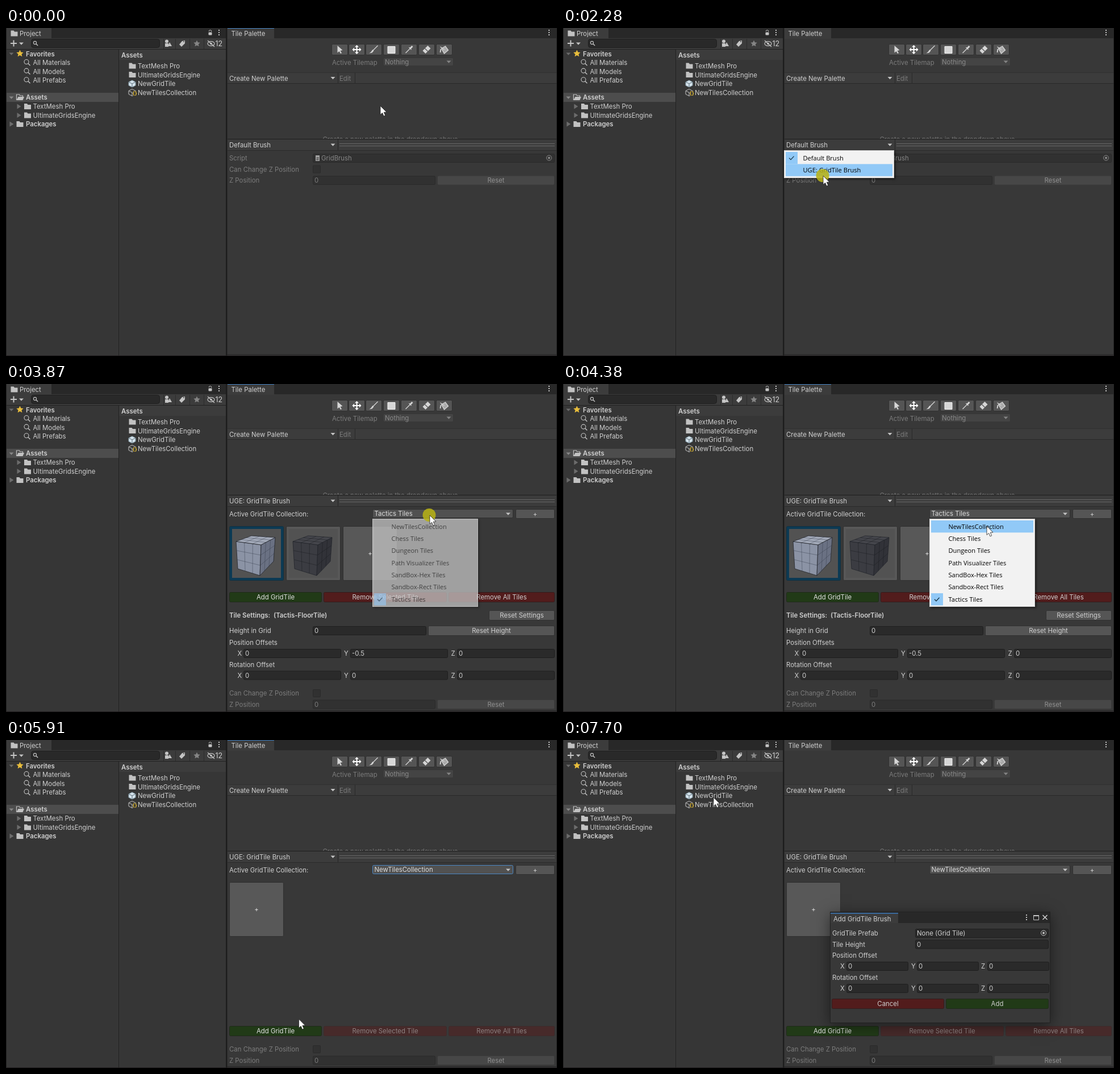
An HTML page with a canvas that plays this animation: 970x577 px, repeating every 8 s.

```html
<!DOCTYPE html>
<html>
<head>
<meta charset="utf-8">
<style>
html, body { margin: 0; width: 100%; height: 100%; overflow: hidden; background: #383838; }
canvas { display: block; }
</style>
</head>
<body>
<canvas id="stage" width="970" height="577"></canvas>
<script>
const ctx = document.getElementById('stage').getContext('2d');
const LOOP = 8000;
const UI = '11.4px Inter, sans-serif', BOLD = '600 11.4px Inter, sans-serif', MENU = '11.1px "Open Sans", sans-serif';
const INK = '#d0d0d0', DIM = '#7c7c7c', LINE = '#222';
const GREEN = '#213a17', RED = '#521c1c', DIM_RED = '#472a2a';

function rect(x, y, w, h, color) { ctx.fillStyle = color; ctx.fillRect(x, y, w, h); }
function box(x, y, w, h, fill, stroke, r = 2) {
  ctx.beginPath();
  ctx.roundRect(x + .5, y + .5, w - 1, h - 1, r);
  if (fill) { ctx.fillStyle = fill; ctx.fill(); }
  if (stroke) { ctx.strokeStyle = stroke; ctx.lineWidth = 1; ctx.stroke(); }
}
function text(s, x, cy, color = INK, font = UI, align = 'left') {
  ctx.font = font; ctx.fillStyle = color; ctx.textAlign = align;
  ctx.fillText(s, x, cy + 4);
}
function poly(points, fill, stroke, width = 1) {
  ctx.beginPath();
  points.forEach(p => ctx.lineTo(p[0], p[1]));
  ctx.closePath();
  if (fill) { ctx.fillStyle = fill; ctx.fill(); }
  if (stroke) { ctx.strokeStyle = stroke; ctx.lineWidth = width; ctx.stroke(); }
}
function line(x1, y1, x2, y2, color, width = 1) {
  ctx.strokeStyle = color; ctx.lineWidth = width;
  ctx.beginPath(); ctx.moveTo(x1, y1); ctx.lineTo(x2, y2); ctx.stroke();
}
function circle(x, y, r, fill, stroke, width = 1) {
  ctx.beginPath(); ctx.arc(x, y, r, 0, 7);
  if (fill) { ctx.fillStyle = fill; ctx.fill(); }
  if (stroke) { ctx.strokeStyle = stroke; ctx.lineWidth = width; ctx.stroke(); }
}
function shifted(x, y, draw) { ctx.save(); ctx.translate(x, y); draw(); ctx.restore(); }

// Icons
const arrowDown = (x, y, c = '#c4c4c4') => poly([[x - 4, y - 2], [x + 4, y - 2], [x, y + 2.2]], c);
const arrowRight = (x, y) => poly([[x - 3, y - 4.5], [x + 4, y], [x - 3, y + 4.5]], '#6c6c6c');
const dots = (x, y) => [-4, 0, 4].forEach(d => rect(x - 1, y + d - 1, 2, 2, '#c4c4c4'));
function star(x, y, r, color) {
  const pts = [];
  for (let i = 0; i < 10; i++) {
    const a = i * Math.PI / 5 - Math.PI / 2, d = i % 2 ? r * .48 : r;
    pts.push([x + d * Math.cos(a), y + d * Math.sin(a)]);
  }
  poly(pts, color);
}
function magnifier(x, y, r, c = '#c4c4c4') {
  circle(x - 1, y - 1, r, null, c, 1.1);
  line(x - 1 + r * .7, y - 1 + r * .7, x + r + 1.5, y + r + 1.5, c, 1.4);
}
function folder(x, y) {
  poly([[x - 6, y - 5], [x - 1, y - 5], [x + .5, y - 3], [x + 6, y - 3], [x + 6, y + 5], [x - 6, y + 5]], '#c2c2c2');
}
function openFolder(x, y) {
  poly([[x - 6, y + 4], [x - 6, y - 5], [x - 1, y - 5], [x, y - 3], [x + 5, y - 3], [x + 5, y - 1]], null, '#c2c2c2', 1.2);
  poly([[x - 6, y + 5], [x - 3, y - 1], [x + 7.5, y - 1], [x + 5, y + 5]], '#c2c2c2');
}
function hexCube(x, y, solid) {
  const p = [[x, y - 6], [x + 6, y - 3], [x + 6, y + 3], [x, y + 6], [x - 6, y + 3], [x - 6, y - 3]];
  poly(p, solid && '#d5e3ec', solid ? '#8da4b0' : '#c4c4c4');
  const c = solid ? '#596b76' : '#c4c4c4';
  line(x - 6, y - 3, x, y, c); line(x + 6, y - 3, x, y, c); line(x, y, x, y + 6, c);
}

// Widgets
function button(label, x, y, w, h = 17, fill = '#555', ink = INK, stroke = '#303030') {
  box(x, y, w, h, fill, stroke);
  text(label, x + w / 2, y + h / 2, ink, UI, 'center');
}
function field(value, x, cy, w, off) {
  box(x, cy - 8, w, 16, off ? '#313131' : '#2a2a2a', off ? '#2a2a2a' : '#1e1e1e');
  text(value, x + 3, cy, off ? DIM : INK);
}
function dropdown(label, x, y, w, focus) {
  box(x, y, w, 16, '#515151', focus ? '#4a87c4' : '#303030');
  text(label, x + 3.5, y + 8, '#dedede');
  arrowDown(x + w - 9, y + 8.5);
}
function vectorRow(values, cy, labels, xs, w) {
  ['X', 'Y', 'Z'].forEach((n, i) => {
    text(n, labels[i], cy);
    field(values[i], xs[i], cy, w);
  });
}
function picker(x, y, c) { circle(x, y, 4.5, null, c); circle(x, y, 2, c); }

function projectPanel() {
  rect(0, 38, 388, 539, '#363636');
  rect(0, 0, 388, 18, '#282828');
  rect(1, 0, 79, 19, '#3c3c3c');
  rect(0, 18, 388, 19, '#3c3c3c');
  rect(0, 37, 388, 1, LINE);
  folder(14.5, 9.5); text('Project', 24, 9.5);
  box(356, 7, 7, 6, '#c4c4c4', null, 1);
  ctx.beginPath(); ctx.arc(359.5, 6, 2.3, Math.PI, .3); ctx.strokeStyle = '#c4c4c4'; ctx.stroke();
  dots(375, 8);

  rect(8, 26, 11, 2, '#c4c4c4'); rect(12.5, 21.5, 2, 11, '#c4c4c4');
  arrowDown(27, 27.5);
  box(44, 19, 227, 16, '#292929', '#1e1e1e', 4);
  magnifier(52, 27, 2.6);
  [277, 298, 323, 348].forEach(x => rect(x, 19, 1, 18, '#2c2c2c'));
  circle(283, 23.5, 3, '#c4c4c4'); rect(280, 27, 6, 6, '#c4c4c4');
  poly([[288, 25], [292, 32], [285, 32]], '#c4c4c4');
  poly([[305, 29], [310, 23], [315, 22], [315, 27], [309, 33]], '#c4c4c4');
  circle(313, 24, .9, '#3c3c3c');
  star(336, 27.5, 6, '#858585');
  ctx.beginPath(); ctx.ellipse(361, 27.5, 6, 3.8, 0, 0, 7);
  ctx.strokeStyle = '#c4c4c4'; ctx.lineWidth = 1.2; ctx.stroke();
  circle(361, 27.5, 1.8, '#c4c4c4');
  line(355, 22, 367, 33, '#c4c4c4', 1.3);
  text('12', 368.5, 27.5, INK, '12.4px Inter, sans-serif');

  rect(1, 114, 197, 16, '#4d4d4d');
  arrowDown(9.5, 45.5, '#6c6c6c'); star(24.5, 45, 6.5, '#e8bd3c'); text('Favorites', 35, 45.5, INK, BOLD);
  ['All Materials', 'All Models', 'All Prefabs'].forEach((s, i) => {
    const y = 61 + i * 15.6;
    magnifier(37, y - .5, 4); text(s, 47.5, y);
  });
  arrowDown(9.5, 122.5, '#888'); openFolder(24.5, 122); text('Assets', 35, 122, INK, BOLD);
  ['TextMesh Pro', 'UltimateGridsEngine'].forEach((s, i) => {
    arrowRight(22.5, 138 + i * 15.6); folder(38, 138 + i * 15.6); text(s, 47.5, 138 + i * 15.6);
    folder(222.5, 66.5 + i * 15.6); text(s, 232, 67 + i * 15.6);
  });
  arrowRight(9.5, 169); folder(24.5, 169); text('Packages', 35, 169, INK, BOLD);

  rect(199, 38, 189, 18, '#3c3c3c');
  rect(198, 38, 1, 538, LINE);
  text('Assets', 203, 47.5, INK, BOLD);
  hexCube(222, 98, true); text('NewGridTile', 232, 98);
  hexCube(222, 113.5); text('NewTilesCollection', 232, 113.5);
  rect(223, 111, 8, 8, '#363636');
  text('{}', 222.5, 114, '#e3bd36', '700 9px Inter, sans-serif');
  rect(0, 0, 1, 577, '#202020');
}

function toolIcon(i, x, y) {
  const c = '#d6d6d6';
  shifted(x, y, () => {
    if (i === 0) poly([[-4, -7], [5, 1], [1, 2], [3.5, 6], [1.5, 7], [-.8, 3], [-4, 5.5]], c);
    if (i === 1) {
      line(-6, 0, 6, 0, '#fff', 2); line(0, -6, 0, 6, '#fff', 2);
      for (let k = 0; k < 4; k++) {
        ctx.rotate(Math.PI / 2);
        poly([[4.5, -3.5], [8, 0], [4.5, 3.5]], '#fff');
      }
    }
    if (i === 2) { line(7, -7, -2, 2, c, 1.3); poly([[-2, 0], [0, 2], [-3, 5.5], [-8, 6.5], [-5, 4]], c); }
    if (i === 3) box(-7, -6, 14, 13, c, '#f4f4f4', 0);
    if (i === 4) { line(-6, 6, 2, -2, c, 1.3); line(0, -4, 4, 0, c, 1.3); line(2, -2, 6, -6, c, 2.8); }
    if (i === 5) {
      poly([[-7, 2], [2, -7], [7, -2], [-2, 7]], c);
      line(-3, -2, 2, 3, '#555', 1.2);
    }
    if (i === 6) {
      poly([[-5, -2], [2, -6], [7, 1], [0, 7]], '#aaa', c, 1.3);
      line(-7, -5, 0, 0, c, 1.2); line(-6, -1, -7, 5, c, 1.8);
    }
  });
}

function palettePanel(focused, brush) {
  rect(389, 0, 581, 18, '#282828');
  rect(390, 0, 82, 19, '#3c3c3c');
  if (focused) rect(390, 0, 82, 1, '#3a79bb');
  text('Tile Palette', 396.5, 9.5);
  dots(956, 8);
  [573, 603, 633, 664, 695, 726, 757].forEach((x, i) => {
    box(x, 28, 29, 20, '#555', '#303030');
    toolIcon(i, x + 14.5, 38);
  });
  text('Active Tilemap', 574, 61, DIM);
  box(664, 52, 124, 15, '#444', '#373737');
  text('Nothing', 667, 59.5, '#898989'); arrowDown(779.5, 59.5, '#858585');

  rect(389, 78, 581, 20, '#3c3c3c');
  rect(389, 78, 581, 1, '#303030'); rect(389, 97, 581, 1, '#292929');
  text('Create New Palette', 393, 88.5); arrowDown(575.5, 88);
  text('Edit', 587, 88.5, DIM);
  rect(584, 79, 1, 18, '#292929'); rect(614, 79, 1, 18, '#292929');
  ctx.save();
  ctx.beginPath(); ctx.rect(389, 98, 580, 97); ctx.clip();
  text('Create a new palette in the dropdown above.', 678, 196, '#757575', UI, 'center');
  ctx.restore();

  rect(389, 195, 581, 1, '#1e1e1e');
  rect(389, 196, 581, 19, '#3c3c3c'); rect(389, 215, 581, 1, '#2b2b2b');
  text(brush, 393, 206); arrowDown(575.5, 205.5);
  rect(584, 196, 1, 19, '#252525');
  rect(587, 203, 379, 1, '#686868'); rect(587, 207, 379, 1, '#686868');
}

function zRows(y) {
  text('Can Change Z Position', 393, y, DIM);
  box(540, y - 7, 14, 14, '#313131', '#2a2a2a', 1);
  text('Z Position', 393, y + 19.5, DIM);
  field('0', 540, y + 19.5, 216, true);
  button('Reset', 759, y + 11, 207, 17, '#474747', '#919191', '#3a3a3a');
}

function defaultBrush() {
  text('Script', 393, 229, DIM);
  field('', 540, 229, 426, true);
  rect(545, 224, 7, 10, '#a0a0a0');
  text('#', 546, 229, '#333', '8px Inter, sans-serif');
  text('GridBrush', 555, 229, '#858585');
  picker(956, 228.5, '#8a8a8a');
  zRows(248.5);
}

function cube(dx, left, right, top, grid) {
  const tl = [405, 277], tb = [432, 267], tr = [474, 270], tf = [449, 283];
  const bl = [408, 325], bf = [447, 337], br = [471, 312];
  const mix = (a, b, u) => [a[0] + (b[0] - a[0]) * u, a[1] + (b[1] - a[1]) * u];
  const face = (a, b, c, d, fill) => {
    poly([a, b, c, d], fill);
    for (const u of [1 / 3, 2 / 3]) {
      line(...mix(a, b, u), ...mix(d, c, u), grid, .7);
      line(...mix(a, d, u), ...mix(b, c, u), grid, .7);
    }
    poly([a, b, c, d], null, '#22252b', .8);
  };
  shifted(dx, 0, () => {
    face(tl, tf, bf, bl, left); face(tf, tr, br, bf, right); face(tl, tb, tr, tf, top);
  });
}

function plusTile(x, hover) {
  box(x, 250, 96, 96, hover ? '#666' : '#585858', '#303030');
  text('+', x + 48, 298, '#e4e4e4', UI, 'center');
}
function collectionHeader(name, focus) {
  text('Active GridTile Collection:', 393, 229);
  dropdown(name, 645, 220, 248, focus);
  button('+', 897, 220, 69, 17);
}
function tileButtons(y, enabled, hover) {
  const fill = enabled ? RED : DIM_RED, ink = enabled ? INK : '#8d8181';
  const edge = enabled ? '#341c1c' : '#3c2c2c';
  button('Add GridTile', 393, y, 163, 18, hover ? '#2b4f1b' : GREEN, '#e4e4e4', '#1f2a1a');
  button('Remove Selected Tile', 559, y, 217, 18, fill, ink, edge);
  button('Remove All Tiles', 779, y, 187, 18, fill, ink, edge);
}

function tacticsBrush(t) {
  collectionHeader('Tactics Tiles');
  box(393, 250, 96, 96, '#0c3a54', '#12303f'); rect(398, 255, 86, 86, '#525252');
  cube(0, '#8b93a5', '#6a7183', '#a2a9b8', 'rgba(50,56,70,.6)');
  box(493, 250, 96, 96, '#585858', '#303030'); rect(498, 255, 86, 86, '#525252');
  cube(100, '#3b3c42', '#313238', '#45464c', 'rgba(28,29,34,.7)');
  plusTile(593, t >= 2680 && t < 2800);
  tileButtons(366, true);
  text('Tile Settings:  (Tactis-FloorTile)', 393, 407, INK, BOLD);
  button('Reset Settings', 850, 398, 116, 18);
  text('Height in Grid', 393, 434); field('0', 540, 434, 200);
  button('Reset Height', 743, 425, 223, 18);
  const labels = [407.5, 595, 783.5], xs = [418, 606, 794];
  text('Position Offsets', 393, 454.5); vectorRow(['0', '-0.5', '0'], 474, labels, xs, 172);
  text('Rotation Offset', 393, 493.5); vectorRow(['0', '0', '0'], 512.5, labels, xs, 172);
  zRows(544);
}

function newBrush(t) {
  collectionHeader('NewTilesCollection', t < 6600);
  plusTile(393);
  tileButtons(503, false, t >= 6040 && t < 6920);
  zRows(544);
}

function popup(x, y, w, items, checked, hovered, alpha) {
  const row = 21.35, h = Math.round(items.length * row + 6);
  ctx.save();
  ctx.globalAlpha = alpha;
  ctx.shadowColor = 'rgba(0,0,0,.55)'; ctx.shadowBlur = 4; ctx.shadowOffsetX = ctx.shadowOffsetY = 2;
  rect(x, y, w, h, '#f2f2f2');
  ctx.shadowColor = 'transparent';
  box(x, y, w, h, null, '#cfcfcf', 0);
  items.forEach((s, i) => {
    const top = y + 3 + i * row, cy = top + row / 2;
    if (i === hovered) rect(x + 3, top, w - 6, row, '#91c9f7');
    if (i === checked) {
      rect(x + 3, top, 21, row, i === hovered ? '#56b0fa' : '#91c9f7');
      ctx.strokeStyle = '#16303f'; ctx.lineWidth = 1.2;
      ctx.beginPath(); ctx.moveTo(x + 9, cy); ctx.lineTo(x + 12, cy + 3); ctx.lineTo(x + 17.5, cy - 3); ctx.stroke();
    }
    text(s, x + 33.5, cy, '#000', MENU);
  });
  ctx.restore();
}

const COLLECTIONS = ['NewTilesCollection', 'Chess Tiles', 'Dungeon Tiles', 'Path Visualizer Tiles',
  'SandBox-Hex Tiles', 'Sandbox-Rect Tiles', 'Tactics Tiles'];

function menus(t) {
  if (t >= 1350 && t < 2330)
    popup(389, 215, 194, ['Default Brush', 'UGE: GridTile Brush'], 0, t < 1520 ? -1 : 1, t < 1400 ? .7 : 1);
  if (t >= 3870 && t < 4960)
    popup(645, 237, 186, COLLECTIONS, 6, t < 4290 ? -1 : 0, t < 3920 ? .6 : 1);
  if (t >= 4960 && t < 5070) {
    rect(648, 240, 180, 21.5, '#495966');
    text('NewTilesCollection', 678.5, 250.7, '#242c33', MENU);
  }
}

function dialog(t) {
  if (t < 6520) return;
  const blank = t < 6600;
  ctx.save();
  ctx.shadowColor = 'rgba(0,0,0,.5)'; ctx.shadowBlur = 24; ctx.shadowOffsetY = 5;
  rect(470, 302, 388, 195, blank ? '#fff' : '#383838');
  ctx.restore();
  if (blank) return;
  rect(470, 302, 388, 20, '#282828');
  rect(470, 304, 120, 18, '#3c3c3c'); rect(470, 304, 120, 1.5, '#3a79bb');
  text('Add GridTile Brush', 476, 314.5);
  dots(816, 312);
  box(828, 308, 10, 9, null, '#c4c4c4', 0); rect(828, 308, 10, 2, '#c4c4c4');
  line(844.5, 308, 852.5, 316, '#d6d6d6', 1.5); line(852.5, 308, 844.5, 316, '#d6d6d6', 1.5);
  text('GridTile Prefab', 474, 340); field('None (Grid Tile)', 620, 340, 235);
  picker(846, 339.5, '#c4c4c4');
  text('Tile Height', 474, 359.5); field('0', 620, 359.5, 235);
  const labels = [488, 613, 736], xs = [499, 623, 747], zero = ['0', '0', '0'];
  text('Position Offset', 474, 379); vectorRow(zero, 398, labels, xs, 109);
  text('Rotation Offset', 474, 418); vectorRow(zero, 437, labels, xs, 109);
  button('Cancel', 473, 455, 198, 18, RED, INK, '#341c1c');
  button('Add', 674, 455, 181, 18, GREEN, INK, '#1f2a1a');
  box(470, 302, 388, 196, null, '#222', 0);
}

// time, x, y, ease-out power used to arrive (0 = smooth both ways)
const PATH = [
  [0, 659, 137], [280, 659, 137, 1], [350, 648, 135, 1], [560, 648, 135, 1], [1200, 535, 206, 0],
  [1400, 535, 206, 1], [1640, 458, 260, 0], [2590, 458, 260, 1], [2680, 572, 281, 1], [2770, 693, 269, 1],
  [3030, 743, 237, 2], [3240, 743, 237, 1], [3360, 746, 231, 0], [4210, 746, 231, 1], [4380, 746, 250, 0],
  [4900, 746, 250, 1], [5000, 744, 250, 1], [5200, 744, 250, 1], [5990, 509, 498, 0], [6030, 509, 498, 1],
  [6090, 495, 512, 1], [6860, 495, 512, 1], [7670, 283, 112, 0], [7700, 265, 101, 1], [LOOP, 265, 101, 1]
];
function cursorAt(t) {
  const i = PATH.findIndex(k => k[0] > t);
  const a = PATH[i - 1], b = PATH[i];
  const u = (t - a[0]) / (b[0] - a[0]);
  const e = b[3] ? 1 - (1 - u) ** b[3] : u * u * (3 - 2 * u);
  return [a[1] + (b[1] - a[1]) * e, a[2] + (b[2] - a[2]) * e];
}

const CLICKS = [[1270, 1440], [2280, 2340], [3770, 3920], [4710, 4900], [6470, 6520]];
function cursor(t) {
  const [x, y] = cursorAt(t);
  if (CLICKS.some(c => t >= c[0] && t < c[1])) circle(x - 1, y - .5, 11.5, 'rgba(184,178,22,.87)');
  shifted(x, y, () => poly([[0, 0], [0, 15.5], [3.6, 12.3], [6, 18], [8.7, 16.8], [6.3, 11.3], [11, 11]],
    '#fff', '#222', .8));
}

function draw(t) {
  rect(0, 0, 970, 577, '#383838');
  projectPanel();
  palettePanel(t < 1350 || (t >= 2330 && t < 6600), t < 2330 ? 'Default Brush' : 'UGE: GridTile Brush');
  if (t < 2330) defaultBrush();
  else if (t < 4960) tacticsBrush(t);
  else newBrush(t);
  rect(387, 0, 2, 577, '#1d1d1d');
  rect(389, 0, 1, 577, '#2b2b2b');
  rect(969, 0, 1, 577, '#202020');
  rect(389, 574, 581, 1, '#242424');
  rect(0, 576, 970, 1, '#201c1e');
  menus(t);
  dialog(t);
  cursor(t);
}

const start = performance.now();
function tick() {
  draw((performance.now() - start) % LOOP);
  requestAnimationFrame(tick);
}
tick();
</script>
</body>
</html>
```
